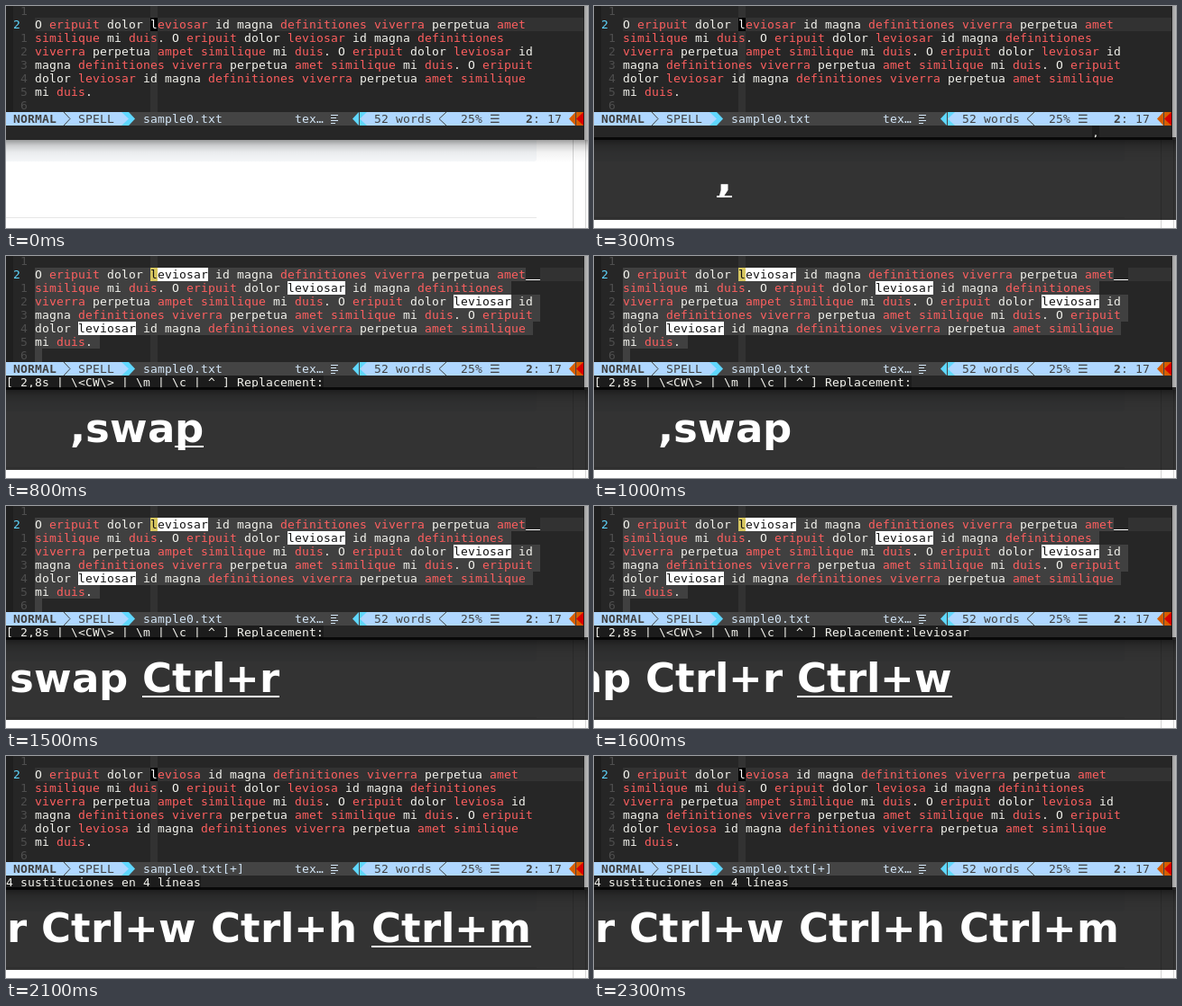
These frames come from a looping animation (645 by 247 pixels, 2.5 s). An HTML page with a canvas:

```html
<!DOCTYPE html>
<html lang="en">
<head>
<meta charset="utf-8">
<title>Swap word</title>
<style>
html, body { margin: 0; width: 645px; height: 247px; overflow: hidden; background: #fff; }
canvas { display: block; }
</style>
</head>
<body>
<canvas id="stage" width="645" height="247"></canvas>
<script>
const ctx = document.getElementById('stage').getContext('2d');
const LOOP = 2500, CW = 8, RH = 15, TOP = -2, LEFT = 32;
const MONO = '13px "DejaVu Sans Mono", monospace';
const BOLD = 'bold ' + MONO;
const KEYS = 'bold 45px "DejaVu Sans", sans-serif';
const C = {
  bg: '#262626', line: '#323232', visual: '#404040', fg: '#f4f4ee', red: '#ff5f5f',
  num: '#4e4e4e', blue: '#afd7ff', cyan: '#5fd7ff', bar: '#444444', ink: '#404040',
  orange: '#d75f00', alert: '#d70000', cmd: '#1c1c1c', pale: '#d3e6f7'
};

const LINES = [
  'O eripuit dolor leviosar id magna definitiones viverra perpetua amet',
  'similique mi duis. O eripuit dolor leviosar id magna definitiones',
  'viverra perpetua ampet similique mi duis. O eripuit dolor leviosar id',
  'magna definitiones viverra perpetua amet similique mi duis. O eripuit',
  'dolor leviosar id magna definitiones viverra perpetua amet similique',
  'mi duis.'
];
const MISSPELT = /^(eripuit|leviosar?|definitiones|viverra|amet|ampet|similique|duis)$/;
const PROMPT = '[ 2,8s | \\<CW\\> | \\m | \\c | ^ ] Replacement:';

// [start ms, typed keys, trailing part that is underlined, editor mode, command row]
const STEPS = [
  [0, '', '', 'normal', ''],
  [300, ',', ',', 'normal', ','],
  [400, ',s', 's', 'normal', ',s'],
  [500, ',s', '', 'normal', ',s'],
  [600, ',sw', 'w', 'normal', 'g@'],
  [700, ',swa', 'wa', 'normal', 'g@a'],
  [800, ',swap', 'p', 'prompt', ''],
  [1000, ',swap', '', 'prompt', ''],
  [1500, ',swap Ctrl+r', 'Ctrl+r', 'prompt', ''],
  [1600, ',swap Ctrl+r Ctrl+w', 'Ctrl+w', 'prompt', 'leviosar'],
  [1800, ',swap Ctrl+r Ctrl+w Ctrl+h', 'Ctrl+h', 'prompt', 'leviosa'],
  [2000, ',swap Ctrl+r Ctrl+w Ctrl+h', '', 'prompt', 'leviosa'],
  [2100, ',swap Ctrl+r Ctrl+w Ctrl+h Ctrl+m', 'Ctrl+m', 'done', '4 sustituciones en 4 líneas'],
  [2300, ',swap Ctrl+r Ctrl+w Ctrl+h Ctrl+m', '', 'done', '4 sustituciones en 4 líneas']
];

function rect(color, x, y, w, h) {
  ctx.fillStyle = color;
  ctx.fillRect(x, y, w, h);
}

// Glyphs advance by whole pixels, as on a terminal grid.
const advance = ch => Math.round(ctx.measureText(ch).width);

function textWidth(str, font) {
  ctx.font = font;
  return [...str].reduce((sum, ch) => sum + advance(ch), 0);
}

function text(str, x, y, color, font = MONO) {
  ctx.font = font;
  ctx.fillStyle = color;
  for (const ch of str) {
    ctx.fillText(ch, x, y);
    x += advance(ch);
  }
}

function tri(color, base, tip) {
  ctx.fillStyle = color;
  ctx.beginPath();
  ctx.moveTo(base, 118);
  ctx.lineTo(tip, 125.5);
  ctx.lineTo(base, 133);
  ctx.fill();
}

function chevron(from, tip) {
  ctx.strokeStyle = C.ink;
  ctx.lineWidth = 1;
  ctx.beginPath();
  ctx.moveTo(from, 118);
  ctx.lineTo(tip, 125.5);
  ctx.lineTo(from, 133);
  ctx.stroke();
}

function drawPage() {
  rect('#ffffff', 0, 0, 645, 247);
  ctx.fillStyle = '#f6f8fa';
  ctx.beginPath();
  ctx.roundRect(-5, 120, 593, 53, 3);
  ctx.fill();
  rect('#e6e6e6', 0, 235, 588, 1);
  rect('#d4d4d4', 628, 140, 1, 107);
  rect('#d4d4d4', 642, 0, 1, 247);
  const shade = ctx.createLinearGradient(0, 149, 0, 174);
  shade.addColorStop(0, 'rgba(0,0,0,.38)');
  shade.addColorStop(.25, 'rgba(0,0,0,.17)');
  shade.addColorStop(.55, 'rgba(0,0,0,.05)');
  shade.addColorStop(1, 'rgba(0,0,0,0)');
  rect(shade, 0, 149, 645, 25);
  rect('rgba(0,0,0,.28)', 641, 0, 4, 149);
  rect(C.bg, 0, 0, 641, 149);
}

function drawText(mode) {
  const prompt = mode === 'prompt';
  rect('#1f1f1f', 0, 0, 8, 118);
  rect(C.line, LEFT, 13, 608, RH);
  rect(C.line, 160, 0, CW, 118);
  for (let row = 0; row < 8; row++) {
    const y = TOP + row * RH + 12;
    if (row === 1) text('2', 8, y, C.cyan);
    else text(String(Math.abs(row - 1)), 16, y, C.num);
  }
  LINES.forEach((src, i) => {
    const line = mode === 'done' ? src.replace('leviosar', 'leviosa') : src;
    const top = TOP + (i + 1) * RH;
    if (prompt) rect(C.visual, LEFT, top, (line.length + 1) * CW, RH);
    for (const m of line.matchAll(/\w+|\./g)) {
      const x = LEFT + m.index * CW, word = m[0];
      const hit = prompt && word === 'leviosar';
      if (hit) rect('#ffffff', x, top, word.length * CW, RH);
      text(word, x, top + 12, hit ? '#111111' : MISSPELT.test(word) ? C.red : C.fg);
    }
  });
  if (prompt) {
    rect(C.visual, LEFT, 103, CW, RH);
    rect(C.bg, 576, 13, 16, RH);
    rect('#ffffff', 576, 26, 16, 1);
  }
  rect(prompt ? '#d7c75f' : '#000000', 160, 13, CW, RH);
  text('l', 160, 25, prompt ? '#111111' : '#ffffff');
}

function drawStatus(mode) {
  const y = 130;
  rect(C.bar, 0, 118, 640, RH);
  rect(C.blue, 0, 118, 128, RH);
  rect(C.cyan, 128, 118, 8, RH);
  tri(C.blue, 128, 136);
  tri(C.cyan, 136, 143);
  text('NORMAL', 8, y, C.ink, BOLD);
  chevron(64, 71);
  text('SPELL', 80, y, C.ink);
  text('sample0.txt' + (mode === 'done' ? '[+]' : ''), 152, y, C.pale);
  text('tex…', 320, y, C.pale);
  [8, 6, 8, 5].forEach((w, i) => rect(C.pale, 360, 121 + i * 3, w, 1));

  rect(C.cyan, 392, 118, 8, RH);
  tri(C.cyan, 391, 384);
  rect(C.bar, 391, 118, 1, RH);
  rect(C.blue, 400, 118, 224, RH);
  tri(C.blue, 400, 392);
  text('52 words', 408, y, C.ink);
  chevron(488, 480);
  text('25%', 504, y, C.ink);
  text('☰', 536, y, C.ink, '13px "DejaVu Sans", sans-serif');
  text('2', 576, y, C.ink, BOLD);
  text(':', 584, y, C.ink);
  text('17', 600, y, C.ink);

  rect(C.blue, 624, 118, 8, RH);
  tri(C.orange, 631, 624);
  rect(C.bar, 631, 118, 1, RH);
  rect(C.orange, 632, 118, 8, RH);
  tri(C.alert, 640, 632);
}

function drawCommand(mode, note) {
  const str = mode === 'prompt' ? PROMPT + note : note;
  const x = mode === 'normal' ? 552 : 0;
  rect(C.cmd, x, 133, str.length * CW, RH);
  text(str, x, 145, C.fg);
}

function drawKeys(keys, recent) {
  rect('rgba(0,0,0,.8)', 0, 146, 645, 92);
  const width = textWidth(keys, KEYS);
  const x = Math.floor(145 - width / 2);
  text(keys, x, 207, '#ffffff', KEYS);
  const w = textWidth(recent, KEYS);
  rect('#ffffff', x + width - w, 211, w, 2);
}

function draw(t) {
  const [, keys, recent, mode, note] = STEPS.findLast(s => s[0] <= t);
  drawPage();
  drawText(mode);
  drawStatus(mode);
  drawCommand(mode, note);
  if (keys) drawKeys(keys, recent);
}

const start = performance.now();
function tick() {
  draw((performance.now() - start) % LOOP);
  requestAnimationFrame(tick);
}
tick();
</script>
</body>
</html>
```
